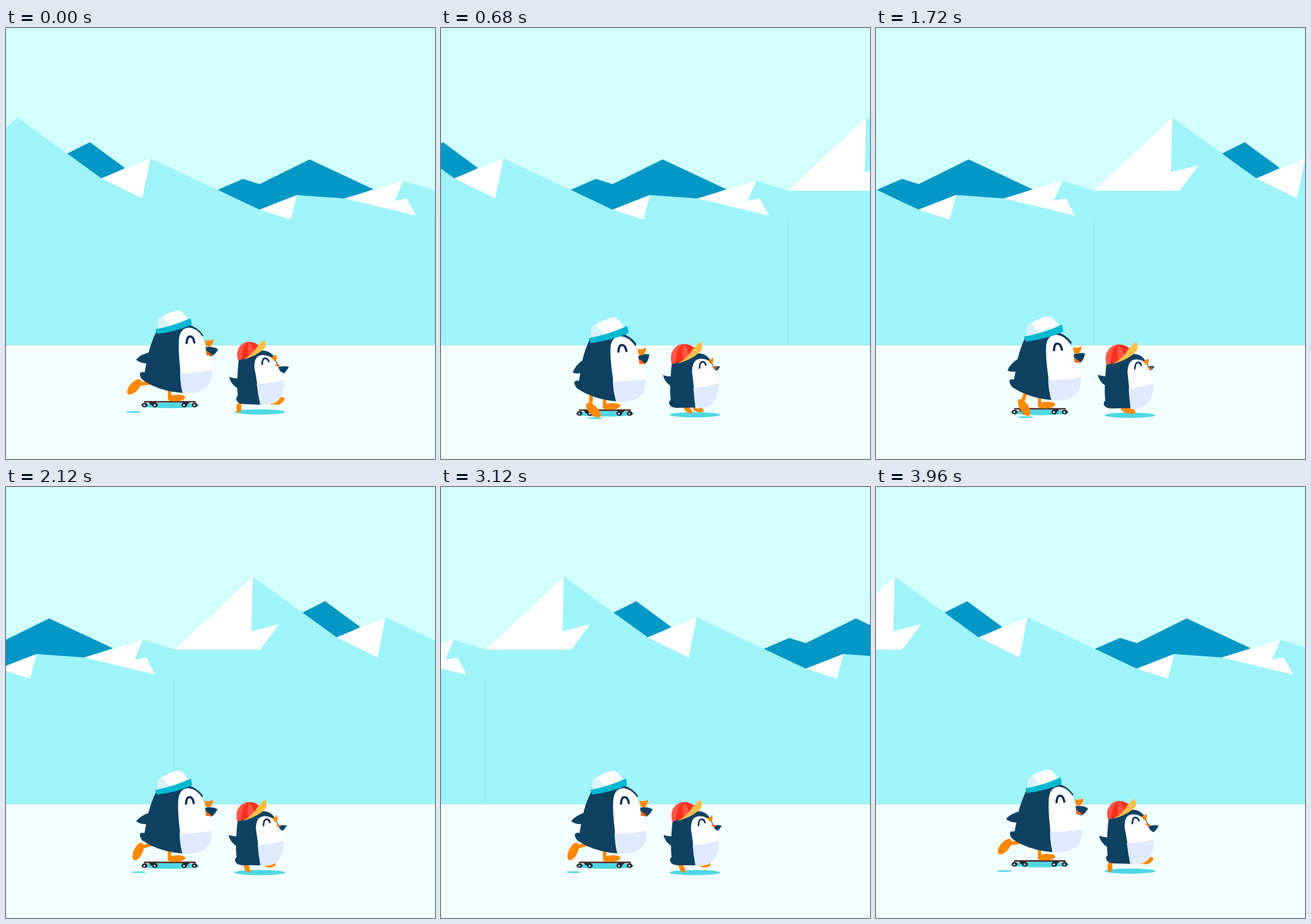
Animation, 746 px wide and 751 px high, one loop 4 s. Source, as an HTML page:

```html
<!DOCTYPE html>
<html lang="en">
<head>
<meta charset="utf-8">
<title>Penguins on the ice</title>
<style>
  html, body { margin: 0; width: 100%; height: 100%; overflow: hidden; background: #d2fffe; }
  svg { display: block; }
  .navy { fill: #0f4162; }
  .white { fill: #fff; }
  .belly { fill: #dfebfc; }
  .orange { fill: #ff8800; }
  .mouth { fill: #fb6514; }
  .blue { fill: #0297c5; }
  .ice { fill: #9ff4f9; }
  .shadow { fill: #4fd7e5; }
  .leg { stroke: #ff8800; stroke-linecap: round; }
  .eye { fill: none; stroke: #0b2c50; stroke-linecap: round; }
</style>
</head>
<body>
<svg width="746" height="751" viewBox="0 0 746 751">
  <defs>
    <g id="range">
      <path class="blue" d="M223 219L263 199L324 244L283 263Z M485 282L529 263L558 272L645 229L756 281L706 298L623 292L558 318Z"/>
      <path class="ice" d="M0 283L137 156L283 262L368 227L558 316.500L623 291L706 297L808 266L862.500 283V553H0Z"/>
      <path class="white" d="M283 262L368 227L354 297Z M558 316.500L623 291L612 334Z M706 297L808 266L793 301L814 297L830 327Z"/>
    </g>
    <g id="wheel">
      <ellipse rx="5" ry="4" fill="#1b2433"/>
      <circle cx="-.5" cy=".3" r="1.700" fill="#fff"/>
    </g>
  </defs>

  <g id="scenery">
    <use href="#range" x="-862"/>
    <use href="#range"/>
    <path class="white" d="M0 283.500L137 156L134.500 251.500L183 239L150 283.500Z"/>
    <path d="M.5 332V553" stroke="#86e3ec"/>
  </g>
  <rect y="552.500" width="746" height="199" fill="#f3ffff"/>
  <path d="M0 552.500H746" stroke="#a5e6ea"/>

  <!-- Skater -->
  <g id="board">
    <ellipse class="shadow" cx="285" cy="657.500" rx="51" ry="5"/>
    <path d="M248 652h14l-6 5h-4z M306 652h14l-6 5h-4z" fill="#1b2433"/>
    <use href="#wheel" x="241" y="657"/><use href="#wheel" x="259" y="657"/>
    <use href="#wheel" x="310" y="657"/><use href="#wheel" x="328" y="657"/>
    <path d="M240 651.300H330" stroke="#4b2b25" stroke-width="2.600"/>
    <path class="leg" d="M284.500 632V643" stroke-width="6"/>
    <path class="orange" d="M281 646Q284 639 298 639Q310 639 312 643Q311 650 294 650.500Q282 651 281 646Z"/>
  </g>
  <ellipse id="footShadow" class="shadow" rx="13" ry="1.600"/>
  <line id="pushLeg" class="leg" stroke-width="6.500"/>
  <g id="pushFoot"><ellipse class="orange" cx="14" rx="16.500" ry="7.800" transform="rotate(-25 14 0)"/></g>
  <g id="skaterBack">
    <path id="skaterBackWing" class="navy" d="M254 564Q234 568 226 578Q236 586 250 584Z"/>
    <path id="skaterFrontWing" class="navy" d="M346 556Q360 554 369 560Q363 570 357 572L346 568Z"/>
    <path class="navy" d="M262 528Q249 553 244 585L241 600Q232 598 233 605Q235 613 242 616Q268 633 308 636L318 620L343 535Q334 522 318 517L290 514Z"/>
  </g>
  <g id="skaterFace">
    <path class="white" d="M307 635.500Q302 615 303 595Q299 560 301 540Q304 522 319 522Q332 523 342 538L347 556Q349 572 354 580Q359 592 358 606Q356 624 340 632Q325 638 307 635.500Z"/>
    <path class="belly" d="M303 601Q335 601 358.300 596L358 606Q356 624 340 632Q325 638 307 635.500Q303 618 303 601Z"/>
    <path class="eye" d="M314 549Q315 537.500 320 537.500Q326 537.500 327.500 548" stroke-width="3.800"/>
    <path class="orange" d="M346 544Q354 546 361 542Q361 551 354 555.500L348 554Z"/>
    <path class="mouth" d="M349 562L360 571L348 570Z"/>
  </g>
  <g id="hat">
    <path fill="#d9f2fc" d="M264 527V509Q267 504 279 499L292 518Z"/>
    <path class="white" d="M272 503Q294 490 303 492.500Q309 496 317 509L286 520Q278 513 272 503Z"/>
    <path fill="#00b8d2" d="M260 525Q292 519 321 505.500L323 517Q296 529 263 533Z"/>
  </g>

  <!-- Runner -->
  <ellipse id="runnerShadow" class="shadow" cx="441.500" cy="669" rx="44" ry="4.600"/>
  <line id="backLeg" class="leg" stroke-width="5"/>
  <line id="frontLeg" class="leg" stroke-width="5"/>
  <ellipse id="backFoot" class="orange" rx="9" ry="4.400"/>
  <ellipse id="frontFoot" class="orange" rx="9.500" ry="4.800"/>
  <path id="runnerBackWing" class="navy" d="M412 611Q396 611 388 608Q391 621 403 628L412 629Z"/>
  <path id="runnerBack" class="navy" d="M405 576Q402 600 402 628L403 641Q399 644 401 649Q404 656 418 655.500L446 656.500L455 620L468 576Q461 562 445 562Z"/>
  <g id="runnerFace">
    <path class="white" d="M442 656Q437 618 432 592Q431 571 445 570Q457 569 466 578L474 590Q483 603 483 620Q482 648 464 654.500Q454 657 442 656Z"/>
    <path class="belly" d="M436 620Q462 620 483 613V620Q482 648 464 654.500Q454 657 442 656Q438 638 436 620Z"/>
    <path class="eye" d="M445.500 586Q445.500 576 450 575.500Q455 575 457 581" stroke-width="2.900"/>
    <path d="M468 578L474 590" stroke="#0f4162" stroke-width="1.200"/>
    <path class="orange" d="M460 573.500Q467 573 469.500 568Q473 577 467 581Z"/>
  </g>
  <path id="runnerFrontWing" class="navy" d="M473 591Q482 588 492 590Q488 598 483 602L477 598Z"/>
  <path id="runnerMouth" class="mouth" d="M467 586L477 587L473 591Z"/>
  <g id="cap">
    <path fill="#ff2f1d" d="M404 579C398 562 408 547.500 422 547Q434 546.500 441 555L432 570Z"/>
    <path fill="#ff5747" d="M421 547Q409 557 410 577L404 579C398 562 408 548 421 547Z M422 547Q419 560 422 573L431 567Q430 553 422 547Z"/>
    <path fill="#ffbf47" d="M412 578Q428 570 437 555Q443 547 450 543Q453 549 451 556Q440 570 412 578Z"/>
  </g>
</svg>
<script>
const LOOP = 4000, STEP = 40, RANGE_WIDTH = 862;
const part = id => document.getElementById(id);
const move = (id, transform) => part(id).setAttribute('transform', transform);
const swing = (t, period) => (1 - Math.cos(2 * Math.PI * t / period)) / 2;
const grow = (x, y, s) => `translate(${x} ${y}) scale(${s}) translate(${-x} ${-y})`;

// Moves the point (x, y) by (dx, dy), stretching and skewing around it.
function lean(id, x, y, dx, dy, stretch, skewX, skewY) {
  move(id, `translate(${x + dx} ${y + dy}) matrix(${1 + stretch} ${skewY} ${skewX} 1 0 0) translate(${-x} ${-y})`);
}

function line(id, x1, y1, x2, y2) {
  for (const [key, value] of Object.entries({ x1, y1, x2, y2 })) part(id).setAttribute(key, value);
}

function poseSkater(k) {
  const ankleX = 236 + 34 * k, ankleY = 620 + 46 * k;
  move('board', `translate(0 ${20.5 * k})`);
  move('footShadow', `translate(${222 + 64 * k} ${669 + 15.2 * k})`);
  line('pushLeg', 252 + 13 * k, 618 + 31 * k, ankleX, ankleY);
  move('pushFoot', `translate(${ankleX} ${ankleY}) rotate(${157 - 122 * k})`);
  lean('skaterBack', 300, 600, -1.5 * k, 21 * k, 0, 0.05 * k, 0);
  lean('skaterFace', 340, 600, -4 * k, 21 * k, 0.04 * k, 0.05 * k, 0);
  move('skaterBackWing', `rotate(${-32 * k} 248 570)`);
  move('skaterFrontWing', `rotate(${-28 * k} 350 568)`);
  move('hat', `translate(0 ${20.5 * k}) ` + grow(291, 517, 1 + 0.14 * k));
}

function poseRunner(k) {
  const backX = 405 + 30 * k, backY = 662 + 4 * k;
  const frontX = 476 - 35 * k, frontY = 650 + 17.5 * k;
  move('runnerShadow', `translate(0 ${6 * k})`);
  line('backLeg', 409 + 20 * k, 652 + 6 * k, backX, backY - 3);
  line('frontLeg', 462 - 28 * k, 654 + 6 * k, frontX - 4, frontY + 2 - 3 * k);
  move('backFoot', `translate(${backX} ${backY}) rotate(${92 - 66 * k})`);
  move('frontFoot', `translate(${frontX} ${frontY}) rotate(${-35 + 60 * k})`);
  move('runnerBackWing', `translate(${-2.5 * k} ${-4 * k})`);
  lean('runnerBack', 445, 600, -k, 6 * k, 0.08 * k, 0, -0.06 * k);
  lean('runnerFace', 483, 600, k, 6 * k, -0.08 * k, -0.06 * k, -0.05 * k);
  move('runnerFrontWing', grow(474, 589, 1 - 0.45 * k));
  move('runnerMouth', `translate(${5 * k} ${5 * k})`);
  move('cap', `translate(0 ${6.5 * k}) ` + grow(425, 563, 1 + 0.12 * k));
}

function draw(now) {
  const t = Math.floor(now % LOOP / STEP) * STEP;
  move('scenery', `translate(${745 - RANGE_WIDTH * Math.max(0, t - 18) / LOOP} 0)`);
  poseSkater(swing(t, 1000));
  poseRunner(swing(t, 500));
}

const start = performance.now();
function tick() {
  draw(performance.now() - start);
  requestAnimationFrame(tick);
}
tick();
</script>
</body>
</html>
```
